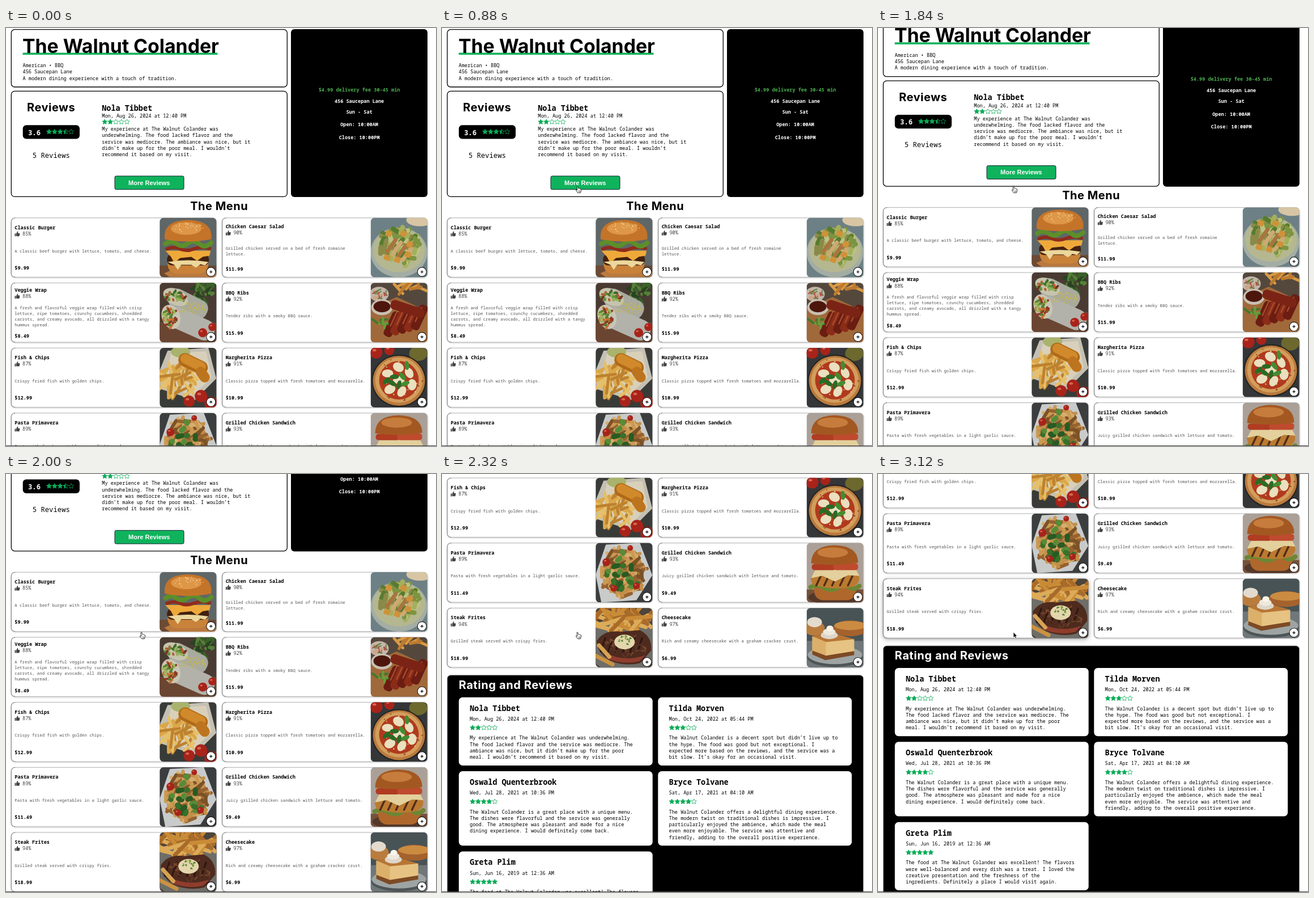
An HTML page that plays this animation: 759 px wide and 737 px high, repeating every 3200 ms.

```html
<!DOCTYPE html>
<html lang="en">
<head>
<meta charset="utf-8">
<title>Restaurant page</title>
<style>
html, body { margin: 0; width: 100%; height: 100%; overflow: hidden; background: #fff; }
svg { display: block; }
text { font-family: "Roboto Mono", "Noto Sans Mono", monospace; }
.head { font-family: Montserrat, Inter, sans-serif; font-weight: 700; }
.button { font-family: "Liberation Sans", Arial, sans-serif; }
.card { filter: drop-shadow(0 1px 1.5px rgba(0,0,0,.22)); }
</style>
</head>
<body>
<svg id="stage" width="759" height="737" viewBox="0 0 759 737"></svg>
<script>
const GREEN = '#0fb35c', STAR = '#0bab57', LOOP = 3200, STEP = 80, SCROLL = 609;
const PLACE = 'The Walnut Colander', STREET = '456 Saucepan Lane';

// Drawing helpers
const rect = (x, y, w, h, fill, r = 0, more = '') =>
  `<rect x="${x}" y="${y}" width="${w}" height="${h}" rx="${r}" fill="${fill}" ${more}/>`;
const bar = (x, y, w, h, fill, r, angle) =>
  rect(x - w / 2, y - h / 2, w, h, fill, r, `transform="rotate(${angle} ${x} ${y})"`);
const oval = (x, y, rx, ry, fill, angle = 0) =>
  `<ellipse cx="${x}" cy="${y}" rx="${rx}" ry="${ry}" fill="${fill}" transform="rotate(${angle} ${x} ${y})"/>`;
const path = (d, fill, more = '') => `<path d="${d}" fill="${fill}" ${more}/>`;
const line = (d, stroke, width) =>
  path(d, 'none', `stroke="${stroke}" stroke-width="${width}" stroke-linecap="round" stroke-linejoin="round"`);
const group = (x, y, body, more = '') => `<g transform="translate(${x} ${y})" ${more}>${body}</g>`;
// y is the middle of the capitals
const text = (x, y, s, size = 8.57, weight = 400, fill = '#000', more = '') =>
  `<text x="${x}" y="${y + size * .355}" font-size="${size}" font-weight="${weight}" fill="${fill}" ${more}>${s}</text>`;
const lines = (x, y, gap, list, ...style) =>
  list.map((s, i) => text(x, y + i * gap, s, ...style)).join('');
const CENTER = 'text-anchor="middle"';
const head = (x, y, s, size, fill, more = '') => text(x, y, s, size, 700, fill, 'class="head" ' + more);

let seed = 7;
const rnd = () => (seed = seed * 16807 % 2147483647) / 2147483647;
// Scatter n bits over an oval area
const scatter = (n, cx, cy, sx, sy, colors, w, h) => {
  let out = '';
  for (let i = 0; i < n; i++) {
    const a = rnd() * 6.283, d = Math.sqrt(rnd());
    out += bar(cx + sx * d * Math.cos(a), cy + sy * d * Math.sin(a),
      w * (.7 + rnd() * .5), h, colors[i % colors.length], h / 2, rnd() * 180);
  }
  return out;
};

const starPath = 'M' + Array.from({ length: 10 }, (_, i) => {
  const r = i % 2 ? 2.3 : 4.7, a = i * Math.PI / 5;
  return (r * Math.sin(a)).toFixed(2) + ' ' + (-r * Math.cos(a)).toFixed(2);
}).join('L') + 'Z';
const stars = (x, y, score) => [0, 1, 2, 3, 4].map(i => {
  const outline = `stroke="${STAR}" stroke-width=".8" stroke-linejoin="round"`;
  const part = score - i;
  return group(x + i * 9.8, y, path(starPath, part >= 1 ? STAR : 'none', outline) +
    (part > 0 && part < 1 ? path('M0-4.7L-1.35-1.86L-4.47-1.45L-2.19.71L-2.76 3.8L0 2.3Z', STAR) : ''));
}).join('');

const thumb = path('M0 4h2v5H0zM2.6 4.2L4.7.2Q6 .2 5.8 1.6L5.4 3.4H8Q9 3.5 8.9 4.5L8.2 8Q8 8.9 7 8.9H4Q3 8.8 2.6 8.3Z', '#444');

// Dishes, each in a 100 x 105 box
const tomato = (x, y, r) => oval(x, y, r, r, '#a8231a') + oval(x - r * .3, y - r * .35, r * .3, r * .2, '#d9654f');
const dishes = {
  burger: () => rect(0, 0, 100, 105, '#5f6668') + rect(0, 84, 100, 21, '#6d4a33') +
    path('M8 98L26 90H92L100 96V105H18Z', '#b9793f') +
    path('M14 80H86Q86 98 70 99H30Q14 97 14 80Z', '#c98239') +
    rect(13, 64, 74, 20, '#42210f', 9) +
    path('M10 58H90L88 67L76 69L66 76L56 69L36 71L26 80L20 69Z', '#efa93a') +
    path('M14 78Q50 72 86 78L80 84L72 82L64 88L56 83H38L32 92L26 83Z', '#ecd79c') +
    line('M13 55Q25 50 36 55T60 55T88 54', '#8f2c1b', 6) +
    line('M10 46Q20 39 30 46T50 45T70 46T91 44', '#5c8f2a', 8) +
    path('M9 38Q5 5 50 4Q95 5 91 38Q50 46 9 38Z', '#c47429') +
    oval(47, 19, 27, 11, '#de9647') + scatter(30, 49, 18, 29, 10, ['#f6dda6'], 2, 1.2),
  salad: () => rect(0, 0, 100, 105, '#6d8085') + oval(87, 4, 24, 11, '#d7c5a4') +
    oval(50, 61, 50, 44, '#a3ada4') + oval(50, 57, 46, 39, '#b5b790') +
    scatter(75, 50, 52, 37, 31, ['#7c9540', '#a3b05c', '#587b2f', '#bdc284', '#8a8a48'], 18, 8) +
    [0, 1, 2, 3].map(i => bar(37 + i * 9, 49 + i * 5, 32, 7, i % 2 ? '#cfa873' : '#a9743f', 3, -55)).join('') +
    [[32, 28], [58, 28], [69, 47], [29, 70], [66, 65], [47, 74]].map(p => bar(...p, 11, 10, '#cf9239', 2, 20)).join(''),
  wrap: () => rect(0, 0, 100, 105, '#4a3b32') + rect(0, 70, 100, 35, '#6a4632') +
    scatter(24, 80, 16, 24, 18, ['#3b602a', '#557f38', '#2a4223'], 15, 6) +
    bar(50, 37, 74, 34, '#a9aa9f', 15, 27) + oval(28, 25, 23, 14, '#c6c4ae', 25) +
    scatter(34, 28, 25, 18, 10, ['#628f38', '#b65c2f', '#3f6b2f', '#96b05c', '#6e3520'], 8, 4) +
    bar(54, 72, 90, 37, '#b2b2aa', 17, 24) + oval(20, 60, 16, 22, '#c9c5b4', -20) +
    scatter(38, 19, 60, 12, 18, ['#c96f2e', '#557f32', '#9bb55a', '#8c3823'], 9, 4) +
    scatter(40, 58, 45, 24, 11, ['#c9b83d'], 4, 1.2) + tomato(76, 88, 8) + tomato(93, 78, 7),
  ribs: () => rect(0, 0, 100, 105, '#54483d') + path('M0 46L46 25L100 50V105H0Z', '#a0693a') +
    scatter(10, 72, 8, 28, 9, ['#d79b45', '#bd7a2e'], 27, 5) +
    oval(15, 20, 17, 13, '#c4b5aa') + scatter(18, 15, 20, 13, 8, ['#a84e46', '#d1a07d', '#63833e'], 10, 2) +
    oval(20, 43, 19, 14, '#c8c0b2') + oval(20, 42, 15, 10, '#4d160d') +
    [0, 1, 2, 3, 4].map(i => bar(38 + i * 12, 73 - i * 3, 16, 47, i % 2 ? '#8b2c18' : '#6b1d12', 6, 25) +
      line(`M${46 + i * 11} ${52 - i * 2}l-11 24`, '#a64b2a', 2.5)).join('') +
    bar(65, 46, 62, 17, '#7b2415', 7, 18) + scatter(8, 18, 70, 14, 8, ['#46752d', '#6d9a3a'], 14, 4),
  fish: () => rect(0, 0, 100, 105, '#393b38') + path('M14 5L86 0L100 54L62 92L0 72V40Z', '#c4c0b3') +
    path('M20 10L82 6L92 52L59 84L6 68Z', '#d8d0ba') + oval(37, 7, 17, 10, '#a9b36d') +
    scatter(42, 32, 57, 32, 28, ['#dba74a', '#e6bf69', '#bd8230'], 35, 5) +
    bar(59, 28, 55, 24, '#b06a19', 12, 26) + bar(59, 26, 48, 17, '#d18a2b', 9, 26) +
    bar(76, 47, 30, 18, '#bd741f', 9, 55) + tomato(52, 94, 10) + tomato(73, 85, 11) + tomato(91, 98, 12),
  pizza: () => rect(0, 0, 100, 105, '#343638') + tomato(10, 8, 11) + tomato(33, 4, 9) + oval(84, 10, 16, 13, '#6c682e') +
    oval(50, 58, 48, 46, '#222') + oval(50, 58, 46, 44, '#b97a3d') + oval(50, 57, 42, 40, '#d39d5c') +
    oval(50, 57, 35, 34, '#b03a1e') + scatter(25, 50, 57, 42, 40, ['#8c4a20', '#e6bb82'], 3, 2) +
    [[30, 45], [49, 34], [68, 44], [73, 65], [55, 77], [34, 73], [50, 57]].map((p, i) =>
      oval(...p, 10, 7 + i % 2, '#eadfbe', i * 31)).join('') +
    [[42, 51], [56, 50], [50, 65], [61, 63], [38, 62], [64, 31], [28, 58]].map((p, i) =>
      oval(...p, 8, 4, i % 2 ? '#438c32' : '#286c25', i * 53)).join(''),
  pasta: () => rect(0, 0, 100, 105, '#3c3d3e') + path('M18 3L78 0L100 57L72 101L10 105L0 56Z', '#c9cbca') +
    oval(48, 52, 37, 41, '#a87a40') +
    scatter(120, 48, 52, 38, 42, ['#c48f4a', '#d6ad6c', '#966230', '#cb9a52', '#7c5227'], 20, 6) +
    scatter(22, 50, 50, 33, 36, ['#39702a', '#558c38', '#285b22'], 14, 9) +
    tomato(19, 34, 7) + tomato(32, 80, 6) + tomato(72, 76, 6) + tomato(61, 9, 5),
  sandwich: () => rect(0, 0, 100, 105, '#aaa097') + rect(0, 82, 100, 23, '#75513a') + oval(50, 96, 47, 13, '#54382a') +
    path('M13 78H88Q87 101 70 101H28Q12 99 13 78Z', '#b0672b') +
    line('M7 78Q19 72 31 79T55 79T75 78T93 76', '#6d8634', 8) +
    path('M7 62Q38 47 92 58Q96 69 83 77Q45 85 10 73Z', '#bb7a31') +
    [0, 1, 2, 3, 4].map(i => line(`M${25 + i * 14} 58l-8 17`, '#522d18', 3.5)).join('') +
    path('M15 48L87 47L93 58L73 57L50 68L28 58L8 62Z', '#e3d09c') +
    rect(9, 37, 43, 11, '#b03c22', 5) + rect(47, 36, 44, 12, '#bf4a2e', 5) +
    path('M8 36Q8 5 49 4Q91 5 91 35Q50 42 8 36Z', '#a35822') + oval(46, 17, 27, 9, '#c67c3c'),
  steak: () => rect(0, 0, 100, 105, '#4d443b') + oval(50, 65, 65, 51, '#6e6d68') +
    scatter(44, 47, 20, 51, 21, ['#c98b36', '#dcab58', '#a96b2a'], 43, 7) +
    path('M2 58Q15 38 43 42L78 39Q100 50 98 75L79 97Q50 104 24 92Q2 78 2 58Z', '#4e2b1e') +
    path('M20 89Q48 101 77 94L88 83Q54 96 18 80Z', '#8f3d2d') +
    [0, 1, 2, 3, 4, 5].map(i => line(`M${17 + i * 13} 53l-8 24`, '#2b1711', 3)).join('') +
    scatter(40, 52, 67, 40, 20, ['#7b4930', '#633724'], 8, 2) + oval(51, 60, 18, 13, '#e3d6ac') +
    scatter(20, 51, 57, 12, 8, ['#4e7c34', '#88a048'], 4, 2) +
    bar(15, 92, 40, 7, '#cb9240', 3, 27) + bar(15, 76, 34, 7, '#d6a353', 3, 48),
  cheesecake: () => rect(0, 0, 100, 105, '#485356') + rect(0, 58, 100, 47, '#70777a') +
    oval(14, 36, 18, 13, '#b97c3d') + oval(14, 25, 13, 9, '#e3dbcd') + oval(77, 36, 31, 14, '#a5622d') +
    oval(77, 31, 28, 8, '#cb8c42') + oval(50, 87, 49, 17, '#4d5557') + oval(50, 83, 48, 16, '#9da4a3') +
    path('M10 50L84 55V81L33 89L10 79Z', '#e6c382') +
    path('M10 50L43 43L84 55L34 60Z', '#b87634') + path('M10 50L34 60V89L10 79Z', '#dcb06a') +
    path('M10 75L34 84L84 76V83L33 92L10 82Z', '#7d4a24') +
    oval(40, 48, 15, 7, '#ddd6c9') + oval(40, 42, 11, 6, '#efe9dd') + oval(41, 36, 6, 5, '#faf5ea')
};

const menu = [
  ['Classic Burger', 85, 9.99, ['A classic beef burger with lettuce, tomato, and cheese.'], 'burger'],
  ['Chicken Caesar Salad', 90, 11.99, ['Grilled chicken served on a bed of fresh romaine', 'lettuce.'], 'salad'],
  ['Veggie Wrap', 88, 8.49, ['A fresh and flavorful veggie wrap filled with crisp', 'lettuce, ripe tomatoes, crunchy cucumbers, shredded',
    'carrots, and creamy avocado, all drizzled with a tangy', 'hummus spread.'], 'wrap'],
  ['BBQ Ribs', 92, 15.99, ['Tender ribs with a smoky BBQ sauce.'], 'ribs'],
  ['Fish &amp; Chips', 87, 12.99, ['Crispy fried fish with golden chips.'], 'fish'],
  ['Margherita Pizza', 91, 10.99, ['Classic pizza topped with fresh tomatoes and mozzarella.'], 'pizza'],
  ['Pasta Primavera', 89, 11.49, ['Pasta with fresh vegetables in a light garlic sauce.'], 'pasta'],
  ['Grilled Chicken Sandwich', 93, 9.49, ['Juicy grilled chicken sandwich with lettuce and tomato.'], 'sandwich'],
  ['Steak Frites', 94, 18.99, ['Grilled steak served with crispy fries.'], 'steak'],
  ['Cheesecake', 97, 6.99, ['Rich and creamy cheesecake with a graham cracker crust.'], 'cheesecake']
];

const menuCard = ([name, liked, price, about, dish], i) => {
  const n = about.length, top = 18.8 - 1.6 * n, first = n > 1 ? 63.3 - 4.85 * n : 58.4;
  return group(9 + i % 2 * 372.4, 334.6 + (i >> 1) * 114.7,
    rect(.3, .3, 362.2, 104.4, '#fff', 7, 'class="card" stroke="#999" stroke-width=".7"') +
    line('M7 .3Q.3 .3 .3 7V98Q.3 104.7 7 104.7', '#777', .8) +
    text(6.3, top, name, 8.57, 700) + group(6.5, top + 6.5, thumb) +
    text(20, top + 11.2, liked + '%', 8.57, 400, '#444') +
    lines(6.3, first, 10, about, 7.34, 400, '#555') +
    text(6.3, 86.5 + 1.85 * n, '$' + price, 8.57, 700) +
    group(262.2, 0, dishes[dish](), 'clip-path="url(#photo)"') +
    oval(352.8, 95.4, 8.4, 8.4, '#000') + oval(352.8, 95.4, 7.5, 7.5, '#fff') +
    line('M350.7 95.4h4.2M352.8 93.3v4.2', '#000', 1.2), `id="item${i}"`);
};

const reviews = [
  ['Nola Tibbet', 'Mon, Aug 26, 2024 at 12:40 PM', 2, [`My experience at ${PLACE} was underwhelming.`,
    'The food lacked flavor and the service was mediocre. The', 'ambiance was nice, but it didn’t make up for the poor', 'meal. I wouldn’t recommend it based on my visit.']],
  ['Tilda Morven', 'Mon, Oct 24, 2022 at 05:44 PM', 3, [`${PLACE} is a decent spot but didn’t live up to`,
    'the hype. The food was good but not exceptional. I', 'expected more based on the reviews, and the service was a', 'bit slow. It’s okay for an occasional visit.']],
  ['Oswald Quenterbrook', 'Wed, Jul 28, 2021 at 10:36 PM', 4, [`${PLACE} is a great place with a unique menu.`,
    'The dishes were flavorful and the service was generally', 'good. The atmosphere was pleasant and made for a nice', 'dining experience. I would definitely come back.']],
  ['Bryce Tolvane', 'Sat, Apr 17, 2021 at 04:10 AM', 4, [`${PLACE} offers a delightful dining experience.`,
    'The modern twist on traditional dishes is impressive. I', 'particularly enjoyed the ambience, which made the meal', 'even more enjoyable. The service was attentive and', 'friendly, adding to the overall positive experience.']],
  ['Greta Plim', 'Sun, Jun 16, 2019 at 12:36 AM', 5, [`The food at ${PLACE} was excellent! The flavors`,
    'were well-balanced and every dish was a treat. I loved the', 'creative presentation and the freshness of the', 'ingredients. Definitely a place I would visit again.']]
];
const reviewCard = ([name, date, score, words], i) => {
  const row = i >> 1;
  return group(29.7 + i % 2 * 351.6, SCROLL + [342, 472.3, 613.8][row],
    rect(0, 0, 342, row === 1 ? 131.2 : 120.2, '#fff', 6.5) + text(19.3, 19, name, 13.46, 700) +
    text(19.3, 38, date) + stars(24.3, 53.6, score) + lines(19.3, 71.5, 11.25, words));
};

const frame = 'stroke="#000" stroke-width="1.3"';
const page =
  rect(9.3, 2.7, 487, 101.3, '#fff', 6, frame) +
  rect(29.5, 43.6, 344, 3.6, GREEN) + head(29, 31.8, PLACE, 33.8, '#000') +
  lines(29.5, 66, 11.25, ['American • BBQ', STREET, 'A modern dining experience with a touch of tradition.']) +
  rect(9.3, 111.4, 487, 186, '#fff', 6, frame) +
  head(79.7, 140.2, 'Reviews', 20, '#000', CENTER + ' letter-spacing=".5"') +
  rect(29.7, 171.2, 100.3, 24.4, '#000', 6) + text(39, 184.2, '3.6', 12.24, 700, '#fff') + stars(76, 183, 3.5) +
  text(79.8, 224.3, '5 Reviews', 12.24, 400, '#000', CENTER) +
  text(169.3, 141, reviews[0][0], 13.46, 700) + text(169.3, 155.2, reviews[0][1]) + stars(174.3, 165.6, 2) +
  lines(169.3, 178, 11.25, [`My experience at ${PLACE} was`, 'underwhelming. The food lacked flavor and the',
    'service was mediocre. The ambiance was nice, but it', 'didn’t make up for the poor meal. I wouldn’t', 'recommend it based on my visit.']) +
  rect(192, 261, 122, 23.7, GREEN, 2.5, 'stroke="#123" stroke-width="1"') +
  text(252.8, 272.7, 'More Reviews', 11, 700, '#fff', CENTER + ' class="button"') +
  rect(503, 2, 241, 296, '#000', 6) +
  text(623.6, 108.5, '$4.99 delivery fee 30-45 min', 8.57, 700, '#4caf50', CENTER) +
  [[128.5, STREET], [147.7, 'Sun - Sat'], [170.2, 'Open: 10:00AM'], [192.7, 'Close: 10:00PM']]
    .map(([y, s]) => text(623.6, y, s, 8.57, 700, '#fff', CENTER)).join('') +
  head(376.2, 313.5, 'The Menu', 20, '#000', CENTER + ' letter-spacing=".5"') +
  menu.map(menuCard).join('') +
  rect(9.3, SCROLL + 303, 734.4, 460, '#000', 6, 'stroke="#888" stroke-width=".9"') +
  head(29.5, SCROLL + 320.3, 'Rating and Reviews', 20, '#fff', 'letter-spacing=".6"') +
  reviews.map(reviewCard).join('');

const arrow = path('M0 0V9.6L2.2 7.7L3.7 11.2L5.4 10.4L3.9 7.1H6.7Z', '#000', 'stroke="#fff" stroke-width=".7"');
const hand = path('M-.9.9Q-.8 0 .1.1Q.9.2 1 1L1.4 4Q2.6 3.3 3.2 4.3Q4.5 3.8 5 4.9Q6.5 4.7 6.5 6.2V8.6L5.3 11.8H.6L-2.6 7.4Q-2.6 6 -1.3 6.5L-.3 7.4Z',
  '#fff', 'stroke="#000" stroke-width=".8" stroke-linejoin="round"') + line('M2 8.2v2M3.4 8.2v2M4.8 8.2v2', '#000', .5);

const $ = id => document.getElementById(id);
$('stage').innerHTML = `<defs><clipPath id="photo">${rect(0, 0, 100.4, 105, '#000', 7)}</clipPath></defs>` +
  `<g id="page">${page}</g>` + rect(0, 736, 759, 1, '#444') +
  `<g id="cursor"><g id="arrow">${arrow}</g><g id="hand">${hand}</g></g>`;

const clamp = v => Math.min(1, Math.max(0, v));
const ease = (t, start, span) => (1 - Math.cos(Math.PI * clamp((t - start) / span))) / 2;
const show = (id, on) => $(id).setAttribute('visibility', on ? 'visible' : 'hidden');
const move = (id, x, y) => $(id).setAttribute('transform', `translate(${x} ${y})`);

function draw(now) {
  const t = Math.floor(now % LOOP / STEP) * STEP;
  move('page', 0, -SCROLL * ease(t, 1764, 685));

  const go = ease(t, 400, 400), y = 740 - 461.2 * go;
  const pointing = y < 285 && t < 2480;
  move('cursor', 300 - 61 * go, y);
  show('arrow', t >= 480 && !pointing);
  show('hand', pointing);

  const lift = ease(t, 2480, 320);
  $('item8').style.filter = lift ? `drop-shadow(0 2px 4px rgba(0,0,0,${.28 * lift}))` : '';
  requestAnimationFrame(() => draw(performance.now()));
}
draw(0);
</script>
</body>
</html>
```
